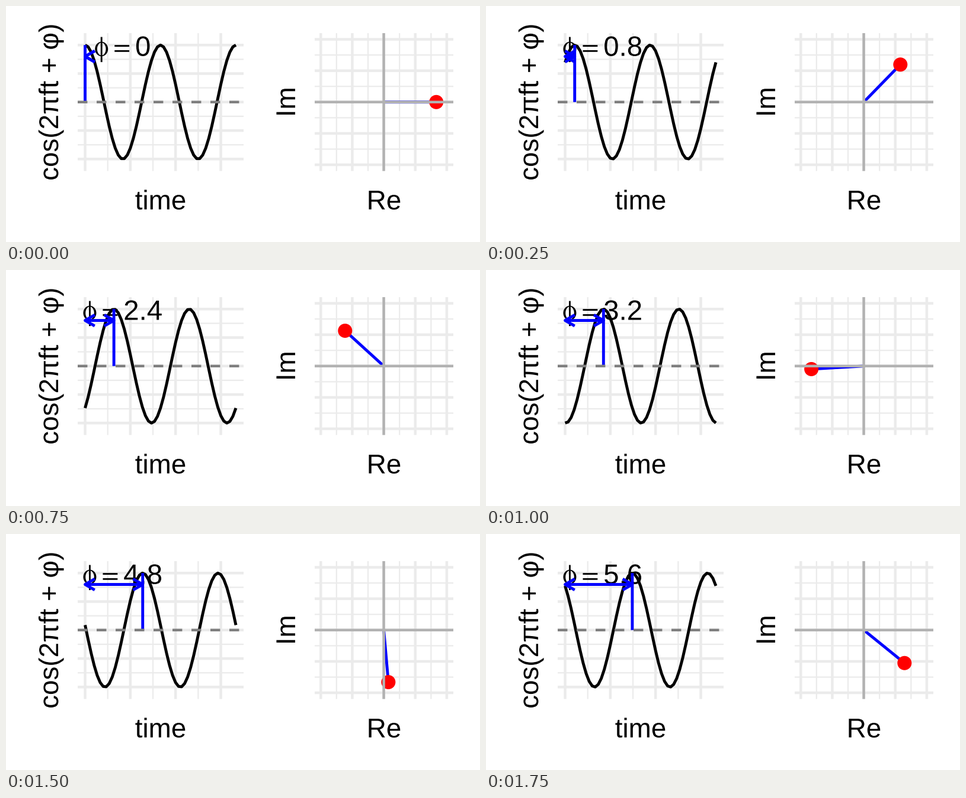
Animation, 800 px wide and 400 px high, one loop 2 s. Source, as a matplotlib script:

```python
import numpy as np
import matplotlib.pyplot as plt
from matplotlib.animation import FuncAnimation
from matplotlib.patches import PathPatch
from matplotlib.textpath import TextPath
from matplotlib.transforms import Affine2D

W, H, DPI = 800, 400, 100
PX = 72 / DPI                  # points per pixel
STEPS, STEP_MS, STEP_PHI = 8, 250, 0.8

LW, BOLD = 4.45, 4.9
GRID, DASH, AXIS = "#ebebeb", "#7f7f7f", "#b2b2b2"
MID_Y, TOP, BOTTOM = 162.8, 46, 279.6

# Wave panel
X0, SPAN, AMP = 133.5, 254.5, 96.6
WAVE_L, WAVE_R = 121, 401
FREQ = 2
ARROW_Y = MID_Y - 0.8 * AMP
HEAD = 18.75 * np.array([np.cos(np.pi / 6), np.sin(np.pi / 6)])

# Phasor panel
CX, RADIUS = 637.6, 88.6
PLANE_L, PLANE_R = 521, 755

# Text
FONT = {"family": "Liberation Sans"}
TITLE = 45.83
EM, LABEL_X, BASE, GAP = 47.4, 196.6, 84.5, 9.2

fig = plt.figure(figsize=(W / DPI, H / DPI), dpi=DPI, facecolor="white")
ax = fig.add_axes([0, 0, 1, 1])
ax.set(xlim=(0, W), ylim=(H, 0))
ax.axis("off")


def line(x, y, color, z, width=LW, **kw):
    return ax.plot(x, y, color=color, lw=width * PX, zorder=z, snap=False,
                   solid_capstyle="butt", solid_joinstyle="round", **kw)[0]


def outline(s, size):
    return TextPath((0, 0), s, size=size, prop=FONT)


def advance(s, size):
    """Pen advance, measured with a bar set after the text."""
    return (outline(s + "|", size).get_extents().x1
            - outline("|", size).get_extents().x1)


def place(s, size, x, y, angle=0):
    """Outline of s with its baseline start at (x, y)."""
    move = Affine2D().rotate_deg(angle).scale(1, -1).translate(x, y)
    return move.transform_path(outline(s, size))


def ink(path):
    return ax.add_patch(PathPatch(path, fc="black", lw=0, zorder=2))


def title(s, x, y, angle=0):
    half = advance(s, TITLE) / 2
    if angle:
        y += half
    else:
        x -= half
    ink(place(s, TITLE, x, y, angle))


def grid(left, right, xs, ys):
    """Gridlines alternate major, minor, major..."""
    for thin in (1, 0):
        width = LW / 2 if thin else LW
        for y in ys[thin::2]:
            line([left, right], [y, y], GRID, 0, width)
        for x in xs[thin::2]:
            line([x, x], [TOP, BOTTOM], GRID, 0, width)


grid(WAVE_L, WAVE_R, X0 + SPAN * 0.15 * np.arange(7),
     MID_Y + AMP * np.linspace(-1, 1, 9))
ticks = RADIUS * np.linspace(-1.2, 1.2, 9)
grid(PLANE_L, PLANE_R, CX + ticks, MID_Y + ticks)

# Fixed lines on top of the moving parts
line([WAVE_L, WAVE_R], [MID_Y] * 2, DASH, 7, dash_capstyle="butt",
     linestyle=(0, (16.4 / LW, 15.6 / LW)))
line([PLANE_L, PLANE_R], [MID_Y] * 2, AXIS, 7)
line([CX, CX], [TOP, BOTTOM], AXIS, 7)

title("time", (WAVE_L + WAVE_R) / 2, 344.7)
title("Re", (PLANE_L + PLANE_R) / 2, 344.7)
title("cos(2πft + φ)", 88, MID_Y, 90)
title("Im", 488, MID_Y, 90)

# Moving parts
t = np.linspace(0, 1, 51)
wave = line([], [], "black", 3, BOLD)
number = ink(outline("0", EM))
strokes = line([], [], "black", 2, 2.9)
bowl = ax.fill([0, 1, 1], [0, 0, 1], color="black", lw=0, zorder=2)[0]
peak, shaft, head_l, head_r, phasor = (line([], [], "blue", 4, BOLD)
                                       for _ in range(5))
dot = plt.Circle((0, 0), 12, color="red", lw=0, zorder=6)
ax.add_patch(dot)

a = np.linspace(0, 2 * np.pi, 61)
ring = np.vstack([np.c_[11 * np.cos(a), 12.3 * np.sin(a)],
                  np.c_[7.3 * np.cos(a), 10.8 * np.sin(a)][::-1]])


def set_label(value):
    s = f"{value:g}"
    phi_w, eq_w = 0.521 * EM, 0.549 * EM
    x = LABEL_X - (phi_w + eq_w + 2 * GAP + advance(s, EM)) / 2
    mid = x + 0.26 * EM
    eq = x + phi_w + GAP
    bowl.set_xy(ring + [mid, BASE - 11.6])
    bars = [eq + 0.5, eq + eq_w - 0.7]
    hi, lo = BASE - 16.9, BASE - 8.2
    strokes.set_data([mid, mid, np.nan, *bars, np.nan, *bars],
                     [BASE - 32, BASE + 10.6, np.nan, hi, hi, np.nan, lo, lo])
    number.set_path(place(s, EM, eq + eq_w + GAP, BASE))


def set_head(art, tip, side):
    dx, dy = HEAD
    art.set_data([tip + side * dx, tip, tip + side * dx],
                 [ARROW_Y - dy, ARROW_Y, ARROW_Y + dy])


def update(i):
    phi = i * STEP_PHI
    shift = X0 + SPAN * phi / (2 * np.pi * FREQ)

    wave.set_data(X0 + SPAN * t,
                  MID_Y - AMP * np.cos(2 * np.pi * FREQ * t - phi))
    peak.set_data([shift, shift], [MID_Y, MID_Y - AMP])
    shaft.set_data([X0, shift], [ARROW_Y, ARROW_Y])
    set_head(head_l, X0, 1)
    set_head(head_r, shift, -1 if i else 1)
    set_label(phi)

    x, y = CX + RADIUS * np.cos(phi), MID_Y - RADIUS * np.sin(phi)
    phasor.set_data([CX, x], [MID_Y, y])
    dot.center = x, y
    return ()


anim = FuncAnimation(fig, update, frames=STEPS, interval=STEP_MS,
                     init_func=lambda: update(0), repeat=True,
                     repeat_delay=0, blit=False)
plt.show()
```
